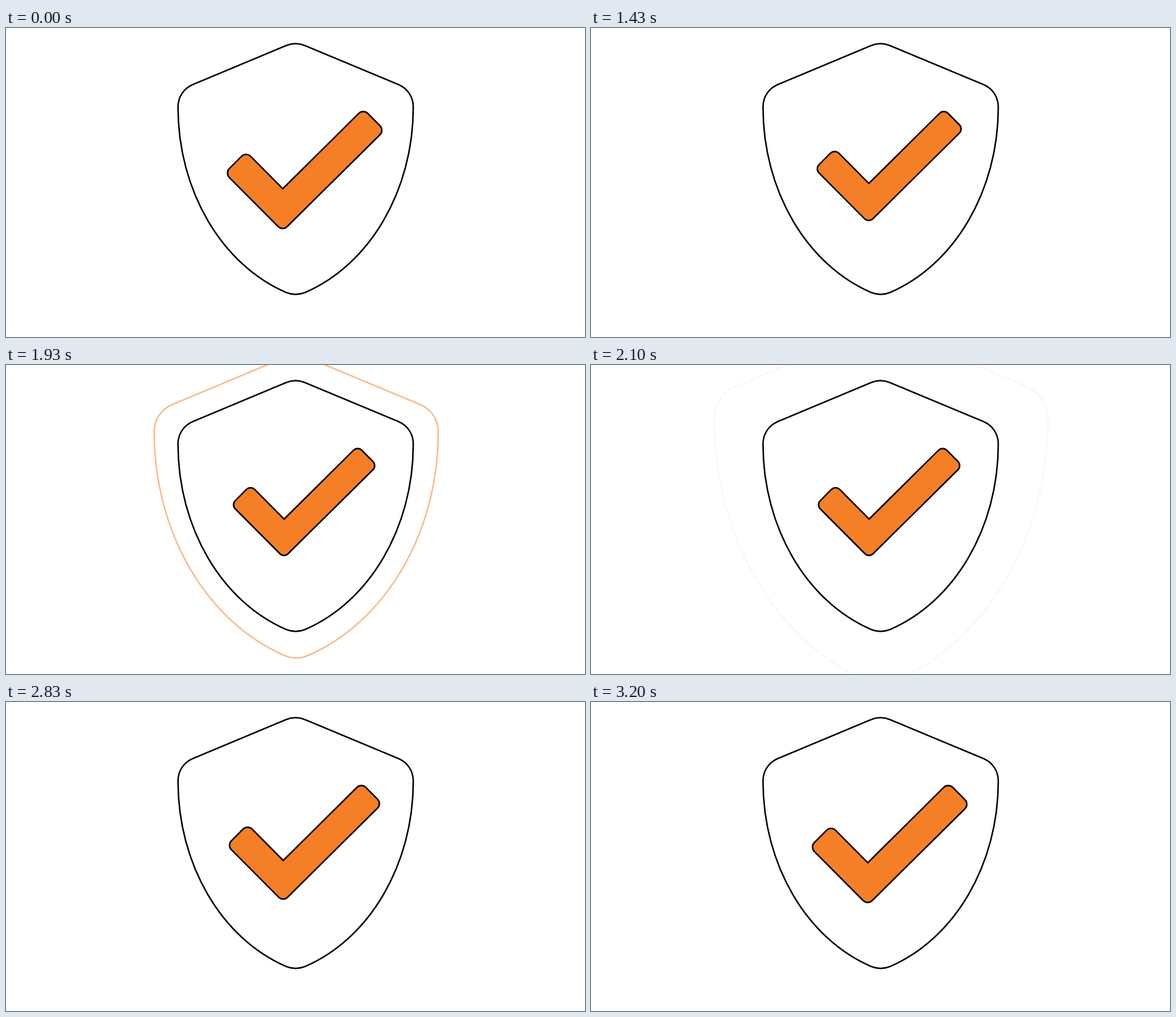
An HTML page with a canvas that plays this animation: 1025x547 px, repeating every 3710 ms.

```html
<!DOCTYPE html>
<html lang="en">
<head>
<meta charset="utf-8">
<title>Shield check</title>
<style>
  html, body { margin: 0; width: 100%; height: 100%; overflow: hidden; background: #fff; }
  canvas { display: block; }
</style>
</head>
<body>
<canvas id="stage" width="1025" height="547"></canvas>
<script>
const ctx = document.getElementById('stage').getContext('2d');
const LOOP = 3710;
const FPS = 30;
const ORANGE = '#f57f27';
const CENTER = { x: 512.75, y: 249.5 };

const clamp = v => Math.min(1, Math.max(0, v));
const easeOut = u => 1 - Math.pow(1 - u, 2.5);
const easeInOut = u => u < 0.5 ? 2 * u * u : 1 - 2 * (1 - u) ** 2;
const progress = (frame, start, length) => clamp((frame - start) / length);

const shield = new Path2D(`M304.5 140 C304.5 122 314.5 107 331 100
  L495.5 31.2 Q512.5 24 529.5 31.2 L694.5 100
  C711 107 721 122 721 140 C721 289 643 419 530 468
  Q512.75 475.2 495.5 468 C382.5 419 304.5 289 304.5 140 Z`);

// Outer corners of the tick; the inner corner stays sharp.
const corners = [[425, 219], [387.5, 256.8], [489.8, 359.5], [670, 181], [632.5, 143.2]];
const inner = [490, 284.5];
const pivot = [517, 148];

function drawTick(scale) {
  const at = point => point.map((v, i) => pivot[i] + (v - pivot[i]) * scale);
  ctx.beginPath();
  ctx.moveTo(...at(inner));
  corners.forEach((corner, i) =>
    ctx.arcTo(...at(corner), ...at(corners[i + 1] || inner), 11.3 * scale));
  ctx.closePath();
  ctx.fillStyle = ORANGE;
  ctx.fill();
  ctx.strokeStyle = '#000';
  ctx.stroke();
}

function drawPulse(p) {
  const scale = 1 + 0.45 * p;
  const offset = 1.3 - 0.6 * p;
  ctx.save();
  ctx.globalAlpha = 1 - p;
  ctx.translate(CENTER.x + offset, CENTER.y + offset);
  ctx.scale(scale, scale);
  ctx.translate(-CENTER.x, -CENTER.y);
  ctx.lineWidth /= scale;
  ctx.strokeStyle = ORANGE;
  ctx.stroke(shield);
  ctx.restore();
}

function drawShield() {
  ctx.fillStyle = '#fff';
  ctx.fill(shield);
  ctx.strokeStyle = '#000';
  ctx.stroke(shield);
}

function render(time) {
  // Hold each pose for one tick of a 30 fps clock, allowing for 10 ms rounding.
  const frame = Math.floor((time % LOOP + 3.5) * FPS / 1000);
  const shrink = easeOut(progress(frame, 35, 17)) - easeOut(progress(frame, 79, 17));
  const pulse = easeInOut(progress(frame, 50.8, 15));

  ctx.fillStyle = '#fff';
  ctx.fillRect(0, 0, 1025, 547);
  ctx.lineWidth = 2.7;
  if (frame >= 50 && pulse < 1) drawPulse(pulse);
  drawShield();
  drawTick(1 - 0.086 * shrink);
}

const start = performance.now();
function tick() {
  render(performance.now() - start);
  requestAnimationFrame(tick);
}
tick();
</script>
</body>
</html>
```
